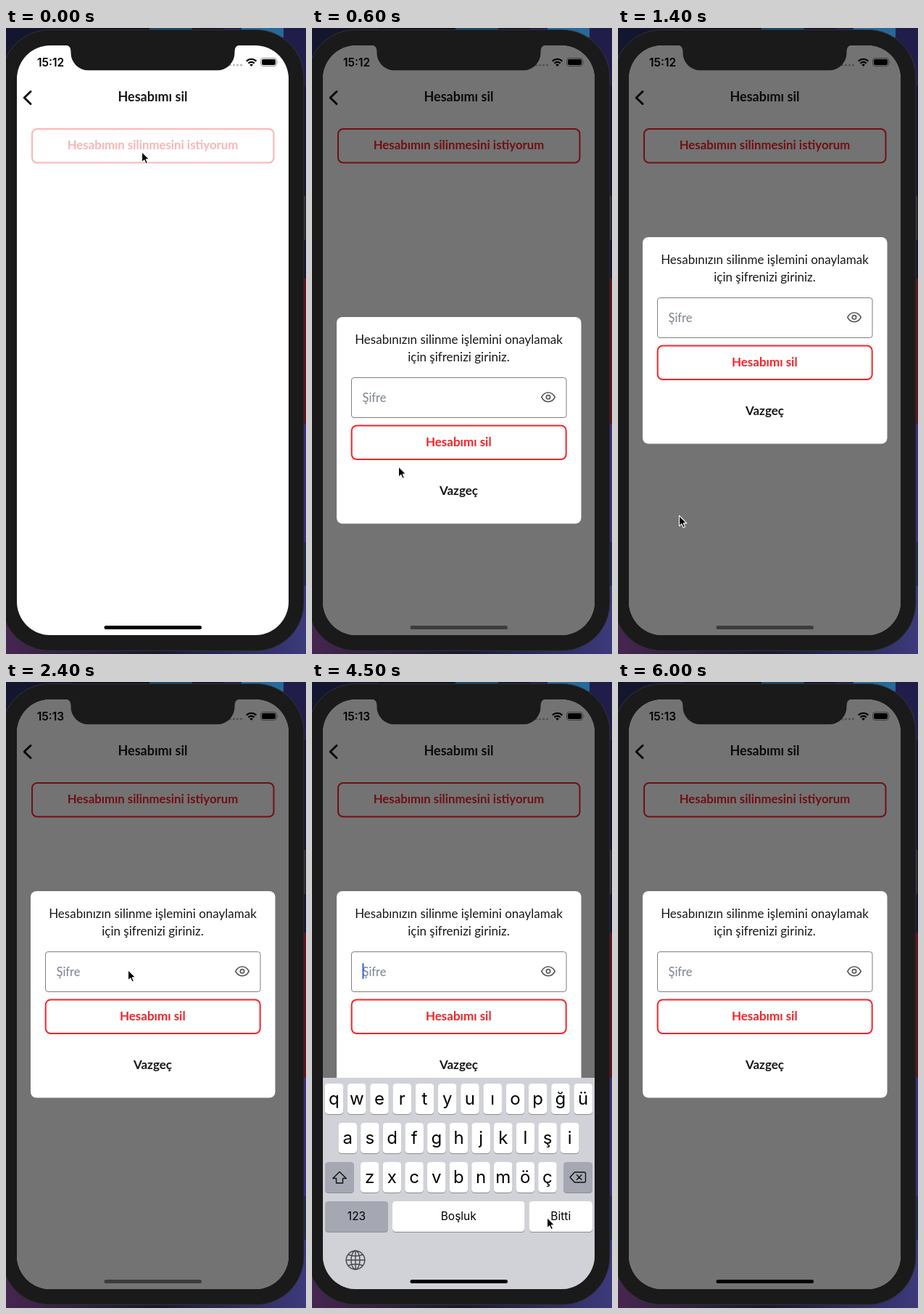
Recreate the animation shown at these times as an HTML page. Size 414 px wide and 862 px high, loop 6.1 s.

```html
<!DOCTYPE html>
<html lang="tr">
<head>
<meta charset="utf-8">
<title>Hesabımı sil</title>
<style>
  html, body { margin: 0; width: 100%; height: 100%; overflow: hidden; background: #12132c; }
  svg { display: block; width: 414px; height: 862px; }
  text { font-family: Lato, sans-serif; text-anchor: middle; fill: #18181a; }
  .bold { font-weight: 700; }
  .p { font-size: 17px; }
  .red { fill: #f92328; }
  .outline { fill: none; stroke: #f92328; stroke-width: 2; }
  .ui, #keys text { font-family: Inter, sans-serif; fill: #000; }
  .ui { font-size: 15.5px; font-weight: 600; }
  .line { fill: none; stroke: #111; stroke-width: 1.4; stroke-linecap: round; stroke-linejoin: round; }

  /* one step = 100 ms = 1.639 % */
  .a { animation: 6100ms step-end infinite; }
  #ask { animation-name: press; }
  #dim { animation-name: dim; }
  #modal { animation-name: rise; }
  #keyboard { animation-name: keyboard; }
  #caret { animation-name: blink; }
  #before { animation-name: before; }
  #after { animation-name: after; }
  #home { animation-name: home; }
  #done { animation-name: done; }
  #doneText { animation-name: doneText; }
  #pointer { animation-name: move; }
  #arrow { animation-name: show; }

  @keyframes press {
    0% { opacity: .34; }
    1.63% { opacity: .34; animation-timing-function: steps(3); }
    6.55%, 100% { opacity: 1; }
  }
  @keyframes dim {
    0% { opacity: 0; }
    3.27% { opacity: 0; animation-timing-function: steps(2); }
    6.55% { opacity: .41; }
    8.19%, 100% { opacity: .55; }
  }
  @keyframes rise {
    0% { transform: translateY(600px); }
    8.19% { transform: translateY(360px); }
    9.83% { transform: translateY(110px); }
    11.47% { transform: translateY(4px); }
    13.11% { transform: translateY(-9px); }
    14.75% { transform: translateY(-3px); }
    16.39%, 100% { transform: none; }
  }
  @keyframes keyboard {
    0% { transform: translateY(300px); }
    44.26% { transform: translateY(230px); }
    45.9% { transform: translateY(80px); }
    47.54% { transform: translateY(12px); }
    49.18% { transform: none; }
    75.4% { transform: translateY(60px); }
    77.04% { transform: translateY(190px); }
    78.68% { transform: translateY(270px); }
    80.32%, 100% { transform: translateY(300px); }
  }
  @keyframes blink {
    0% { opacity: 0; }
    44.26% { opacity: 1; }
    49.18%, 65.57% { opacity: .6; }
    50.81%, 67.21% { opacity: 0; }
    55.73%, 72.13% { opacity: .5; }
    57.37%, 73.77% { opacity: 1; }
    77.04%, 100% { opacity: 0; }
  }
  @keyframes before { 0% { opacity: 1; } 26.22%, 100% { opacity: 0; } }
  @keyframes after { 0% { opacity: 0; } 26.22%, 100% { opacity: 1; } }
  @keyframes home {
    0% { fill: #000; }
    3.27% { fill: #000; animation-timing-function: steps(2); }
    6.55% { fill: #3c3c3c; }
    45.9%, 100% { fill: #000; }
  }
  @keyframes done { 0% { fill: #0672ff; } 72.13%, 100% { fill: #fff; } }
  @keyframes doneText { 0% { fill: #fff; } 72.13%, 100% { fill: #000; } }
  @keyframes move {
    0% { transform: translate(187px, 170px); }
    1.63% { transform: translate(187px, 170px); animation-timing-function: steps(3); }
    6.55% { transform: translate(154px, 536px); animation-timing-function: steps(4); }
    13.11% { transform: translate(84px, 671px); }
    27.86% { transform: translate(84px, 671px); animation-timing-function: steps(6); }
    37.7% { transform: translate(168px, 396px); }
    59.01% { transform: translate(196px, 470px); animation-timing-function: steps(6); }
    68.85%, 100% { transform: translate(324px, 737px); }
  }
  @keyframes show {
    0% { opacity: 1; }
    45.9% { opacity: 0; }
    59.01% { opacity: 1; }
    81.96%, 100% { opacity: 0; }
  }
</style>
</head>
<body>
<svg viewBox="0 0 414 862">
  <defs>
    <clipPath id="screen"><rect x="15" y="24" width="375" height="812" rx="46"/></clipPath>
    <linearGradient id="desk" x2="1" y2="0">
      <stop offset="0" stop-color="#46264f"/>
      <stop offset=".5" stop-color="#17182f"/>
      <stop offset="1" stop-color="#3d3a7c"/>
    </linearGradient>
  </defs>

  <!-- desktop -->
  <rect width="414" height="862" fill="#14152f"/>
  <rect x="300" width="114" height="80" fill="#211d4b"/>
  <rect x="92" width="106" height="3" fill="#0d0f1f"/>
  <rect x="198" width="59" height="4" fill="#154a6b"/>
  <rect x="325" width="58" height="13" fill="#26699a"/>
  <rect x="406" y="345" width="8" height="200" fill="#64101a"/>
  <rect x="406" y="545" width="8" height="163" fill="#3c2f85"/>
  <rect x="406" y="708" width="8" height="60" fill="#1c2c50"/>
  <rect y="768" width="414" height="94" fill="url(#desk)"/>

  <!-- phone -->
  <rect x="410" y="231" width="3" height="61" rx="1" fill="#3b3b38"/>
  <rect x="-6" y="2.5" width="417" height="855" rx="66" fill="#1a1a1a" stroke="#333336"/>

  <g clip-path="url(#screen)">
    <rect x="15" y="24" width="375" height="812" fill="#fff"/>
    <text id="before" class="ui a" x="61.5" y="52.5">15:12</text>
    <text id="after" class="ui a" x="61.5" y="52.5" opacity="0">15:13</text>
    <g fill="#b9b9bb">
      <circle cx="309.5" cy="51" r="1.6"/><circle cx="314.5" cy="51" r="1.6"/>
      <circle cx="319.5" cy="51" r="1.6"/><circle cx="324.5" cy="51" r="1.6"/>
    </g>
    <g fill="none" stroke="#000" stroke-width="2.3">
      <path d="M331.8 45.6a9.8 9.8 0 0 1 13.6 0M334.5 48.6a5.9 5.9 0 0 1 8.2 0"/>
    </g>
    <path d="M336.3 50.6a3.4 3.4 0 0 1 4.6 0l-2.3 2.5z"/>
    <rect x="351.5" y="41.5" width="22" height="11" rx="3.2" fill="none" stroke="#8b8b8b"/>
    <rect x="353" y="43" width="19" height="8" rx="2"/>
    <path d="M374.8 45.2q1.6 1.8 0 3.6z" fill="#8b8b8b"/>

    <path d="M34 87.5L25.2 96l8.8 8.5" fill="none" stroke="#111" stroke-width="3" stroke-linecap="round" stroke-linejoin="round"/>
    <text class="bold" x="202.5" y="101" font-size="18">Hesabımı sil</text>
    <g id="ask" class="a">
      <rect class="outline" x="36" y="139" width="333.5" height="46.5" rx="7"/>
      <text class="bold red" x="202.5" y="167.3" font-size="16.8">Hesabımın silinmesini istiyorum</text>
    </g>

    <rect id="dim" class="a" x="15" y="24" width="375" height="812" opacity="0"/>

    <g id="modal" class="a">
      <rect x="34" y="288" width="337.5" height="284.5" rx="8" fill="#fff"/>
      <text class="p" x="202.5" y="325.3">Hesabınızın silinme işlemini onaylamak</text>
      <text class="p" x="202.5" y="349.3">için şifrenizi giriniz.</text>
      <rect x="54.5" y="371.5" width="296.5" height="55" rx="3.5" fill="#fff" stroke="#7f7f83"/>
      <text x="69.5" y="405" font-size="16.5" style="text-anchor:start;fill:#7c8293">Şifre</text>
      <rect id="caret" class="a" x="69.5" y="387" width="2" height="22" rx="1" fill="#2d62ee" opacity="0"/>
      <g fill="none" stroke="#58585c" stroke-width="1.7">
        <path d="M316.8 398.3C321 389.9 331 389.9 335.2 398.3C331 406.7 321 406.7 316.8 398.3z"/>
        <circle cx="326" cy="398.3" r="2.7"/>
      </g>
      <rect class="outline" x="54.7" y="437.5" width="296" height="46.5" rx="7"/>
      <text class="bold red p" x="202.3" y="466.2">Hesabımı sil</text>
      <text class="bold p" x="202.5" y="533">Vazgeç</text>
    </g>

    <g id="keyboard" class="a">
      <rect x="15" y="545" width="375" height="291" fill="#d0d2d8"/>
      <g id="keys"></g>
      <path class="line" d="M38 674.5l9.2 9h-4.7v6.5h-9v-6.5h-4.7z"/>
      <path class="line" d="M362.5 675h13q2 0 2 2v10q0 2-2 2h-13l-6.5-7zM365.5 678.8l6.4 6.4M371.9 678.8l-6.4 6.4"/>
      <g class="line" style="stroke:#46484c">
        <circle cx="60" cy="796" r="12.8"/><ellipse cx="60" cy="796" rx="6" ry="12.8"/>
        <path d="M60 783.2v25.6M47.2 796h25.6M50 788.5q10 4 20 0M50 803.5q10-4 20 0"/>
      </g>
    </g>
    <rect id="home" class="a" x="135.5" y="823" width="134.5" height="5" rx="2.5"/>
  </g>

  <path d="M82 23.5Q89.5 24 89.5 32V34a24 24 0 0 0 24 24.3H291.500a24 24 0 0 0 24-24.3V32Q315.500 24 323 23.500z" fill="#1a1a1a"/>

  <g id="pointer" class="a">
    <path id="arrow" class="a" d="M.5 .5V14.800L3.800 11.800L6 16.800L8.500 15.700L6.300 10.900H10.800z" stroke="#fff" stroke-width="1.1" stroke-linejoin="round"/>
  </g>
</svg>
<script>
  const GREY = '#a5a8b3';

  function key(x, y, w, label, { fill = '#fff', size = 24, id = '' } = {}) {
    const base = y + (size > 20 ? 28.5 : 26);
    const rectId = id && `id="${id}" class="a"`;
    const textId = id && `id="${id}Text" class="a"`;
    return `<rect x="${x}" y="${y + 1}" width="${w}" height="42" rx="4.6" fill="#8b8d92"/>
      <rect ${rectId} x="${x}" y="${y}" width="${w}" height="42" rx="4.6" fill="${fill}"/>
      <text ${textId} x="${x + w / 2}" y="${base}" font-size="${size}">${label}</text>`;
  }

  const row = (letters, x, y, pitch) =>
    [...letters].map((c, i) => key(x + i * pitch, y, 25.5, c)).join('');

  document.getElementById('keys').innerHTML =
    row('qwertyuıopğü', 17.7, 553, 31.25) +
    row('asdfghjklşi', 36.5, 607, 30.65) +
    row('zxcvbnmöç', 67, 661, 30.65) +
    key(18, 661, 40, '', { fill: GREY }) +
    key(347, 661, 40, '', { fill: GREY }) +
    key(18, 715, 87, '123', { fill: GREY, size: 15.5 }) +
    key(111, 715, 182.5, 'Boşluk', { size: 15.5 }) +
    key(299.5, 715, 87.5, 'Bitti', { size: 15.5, id: 'done' });
</script>
</body>
</html>
```
